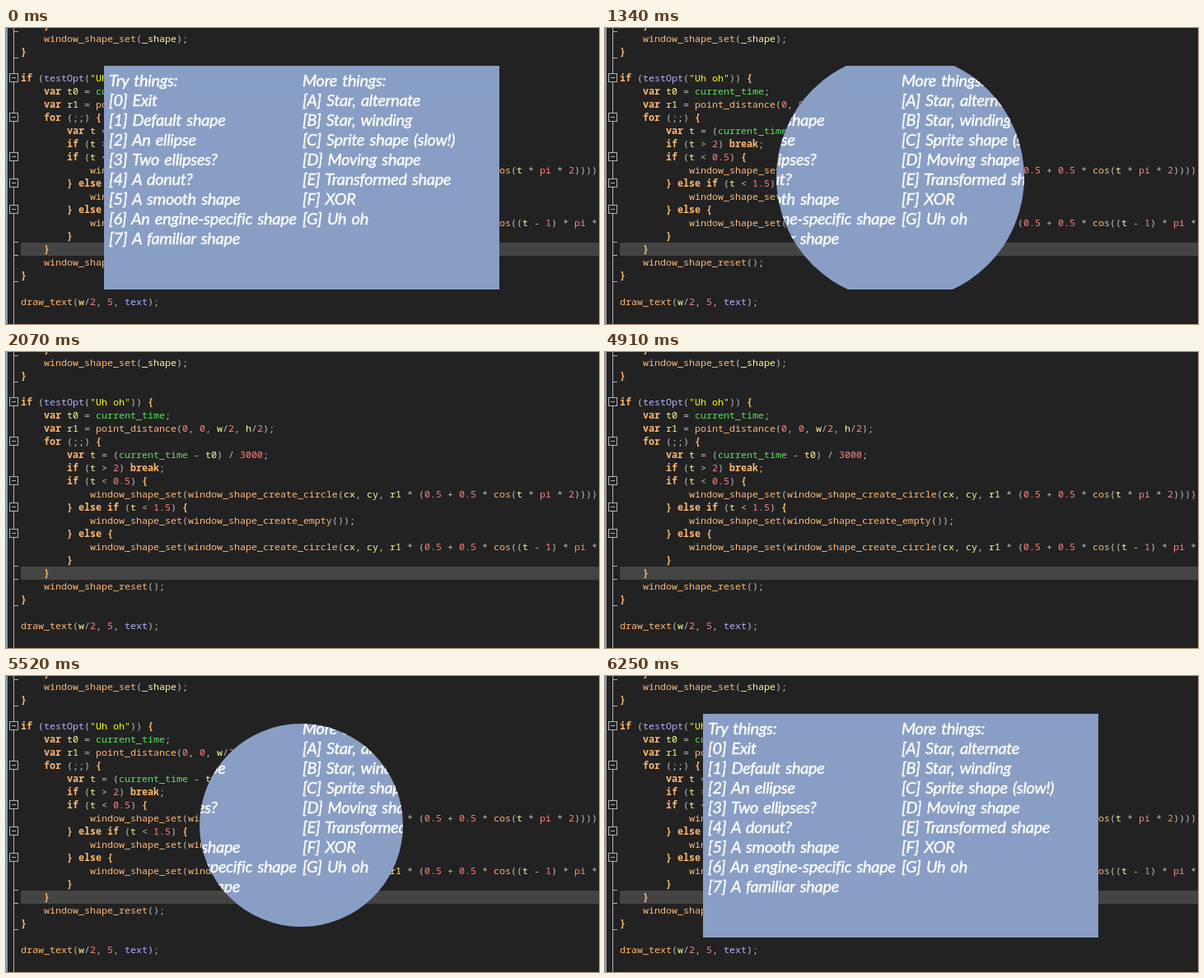
Write an HTML page that moves like this. It is 720x360 px and loops after 7.21 s.

```html
<!DOCTYPE html>
<html lang="en">
<head>
<meta charset="utf-8">
<title>Shaped window</title>
<style>
  html, body { margin: 0; width: 100%; height: 100%; overflow: hidden; background: #222; }
  svg { display: block; width: 720px; height: 360px; }
  .code { font: 11.667px "Noto Sans Mono", "DejaVu Sans Mono", monospace; }
  .menu {
    font: italic 20px Lato, "Open Sans", sans-serif;
    fill: #fff; stroke: #fff; stroke-width: .4px;
    letter-spacing: -.35px; word-spacing: 2px;
  }
  .key { fill: #ffb871; font-weight: bold; }
  .func { fill: #ffb871; }
  .user { fill: #b2b1ff; }
  .local { fill: #fff899; }
  .builtin { fill: #58e55a; }
  .num { fill: #ff8080; }
  .str { fill: #ff0; }
  .op { fill: #c0c0c0; }
</style>
</head>
<body>
<svg id="stage" viewBox="0 0 720 360">
  <defs><clipPath id="hole"><circle id="disc" cx="358.5" cy="181.5" r="300" shape-rendering="crispEdges"/></clipPath></defs>
  <rect width="720" height="360" fill="#222"/>
  <rect x="18" y="261" width="702" height="16" fill="#444"/>
  <rect width="2" height="360" fill="#7f9db9"/>
  <g id="folds" fill="none" stroke="#b4b4b4" shape-rendering="crispEdges"></g>
  <g id="code" class="code"></g>
  <g id="window" clip-path="url(#hole)">
    <rect x="119" y="46" width="480" height="272" fill="#899ec5"/>
    <g id="menu" class="menu"></g>
  </g>
</svg>
<script>
const LOOP = 7210, FRAME = 30, TICK = 100 / 3;
const R1 = Math.hypot(240, 136);
const $ = id => document.getElementById(id);

const source = `    }
    window_shape_set(_shape);
}

if (testOpt("Uh oh")) {
    var t0 = current_time;
    var r1 = point_distance(0, 0, w/2, h/2);
    for (;;) {
        var t = (current_time - t0) / 3000;
        if (t > 2) break;
        if (t < 0.5) {
            window_shape_set(window_shape_create_circle(cx, cy, r1 * (0.5 + 0.5 * cos(t * pi * 2))));
        } else if (t < 1.5) {
            window_shape_set(window_shape_create_empty());
        } else {
            window_shape_set(window_shape_create_circle(cx, cy, r1 * (0.5 + 0.5 * cos((t - 1) * pi * 2))));
        }
    }
    window_shape_reset();
}

draw_text(w/2, 5, text);`;

const menus = [
  [125, "Try things:|[0] Exit|[1] Default shape|[2] An ellipse|[3] Two ellipses?|[4] A donut?|[5] A smooth shape|[6] An engine-specific shape|[7] A familiar shape"],
  [360, "More things:|[A] Star, alternate|[B] Star, winding|[C] Sprite shape (slow!)|[D] Moving shape|[E] Transformed shape|[F] XOR|[G] Uh oh"]
];

function add(parent, name, attrs, text = "") {
  const el = document.createElementNS("http://www.w3.org/2000/svg", name);
  for (const key in attrs) el.setAttribute(key, attrs[key]);
  el.textContent = text;
  parent.append(el);
}

function kind(token) {
  if (/^(if|else|for|var|break|[{}])$/.test(token)) return "key";
  if (/^(window_|point_|draw_|cos$)/.test(token)) return "func";
  if (/^(testOpt|text)$/.test(token)) return "user";
  if (token === "current_time") return "builtin";
  if (/^(\d|pi$)/.test(token)) return "num";
  if (token[0] === '"') return "str";
  return /^\w/.test(token) ? "local" : "op";
}

source.split("\n").forEach((line, row) => {
  for (const match of line.matchAll(/"[^"]*"|[\d.]+|\w+|[{}]|[^\s\w"{}]+/g))
    add($("code"), "text", { x: 18 + match.index * 7, y: 1 + row * 16, class: kind(match[0]) }, match[0]);
});

// Fold margin: spine, block ends, then collapse boxes
add($("folds"), "path", { d: "M9.5 0V360" });
for (const y of [4, 36, 260, 276, 308]) add($("folds"), "path", { d: `M9.5 ${y + .5}h5` });
for (const y of [61, 109, 157, 189, 221]) {
  add($("folds"), "rect", { x: 4.5, y: y - 5.5, width: 10, height: 10, fill: "#222" });
  add($("folds"), "path", { d: `M7 ${y - .5}h5` });
}

for (const [x, items] of menus)
  items.split("|").forEach((item, row) => add($("menu"), "text", { x, y: 71 + row * 24 }, item));

// Hold a moment to the 30 ms grid that starts at the given time
const snap = (t, from) => Math.floor((t - from) / FRAME) * FRAME + from;
const wave = ms => R1 * (0.5 + 0.5 * Math.cos(ms / 3000 * Math.PI * 2));

function radius(t) {
  if (t < 730 || t >= 6250) return 300;
  if (t < 2070) {
    const at = t < 800 ? 740 : Math.min(snap(t, 800), 1970);
    return wave(473 + (at - 1130) / FRAME * TICK);
  }
  if (t < 4910) return 0;
  const at = t < 4980 ? 4920 : Math.min(snap(t, 4980), 6180);
  return wave(5200 + (at - 5520) / FRAME * TICK);
}

function draw(t) {
  const r = radius(t);
  $("window").style.display = r ? "" : "none";
  $("disc").setAttribute("r", r);
}

const start = performance.now();
function tick() {
  draw((performance.now() - start) % LOOP);
  requestAnimationFrame(tick);
}
draw(0);
requestAnimationFrame(tick);
</script>
</body>
</html>
```
